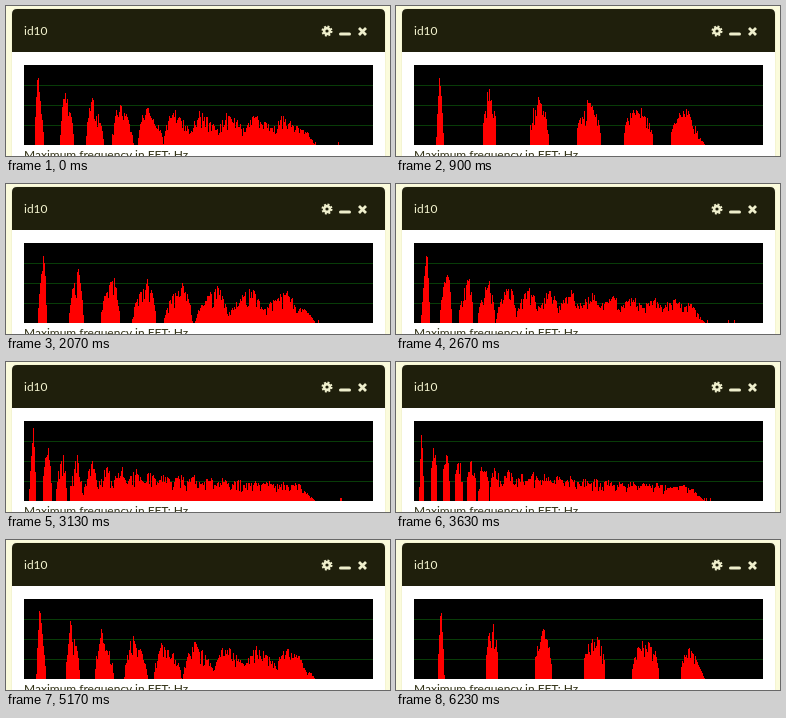
These frames come from a looping animation (384x150 px, 6260 ms). An HTML page:

```html
<!DOCTYPE html>
<html lang="en">
<head>
<meta charset="utf-8">
<title>Spectrum panel</title>
<style>
  html, body { margin: 0; width: 100%; height: 100%; overflow: hidden; background: #fbfbdc; }
  svg { display: block; width: 384px; height: 150px; }
  text { font: 12px Lato, sans-serif; }
</style>
</head>
<body>
<svg viewBox="0 0 384 150">
  <rect x="5.5" y="2.5" width="374" height="170" rx="5" fill="#fff" stroke="#f4f4d2"/>
  <path d="M6 46V8q0-5 5-5H374q5 0 5 5V46z" fill="#1f1f0c"/>
  <text x="18" y="29" fill="#f4f4d0">id10</text>
  <g fill="none" stroke="#eeeecc">
    <circle cx="321" cy="25" r="2.9" stroke-width="2.6"/>
    <circle cx="321" cy="25" r="4.5" stroke-width="2" stroke-dasharray="1.9 1.634"/>
    <path d="M334.5 28H343.5" stroke-width="3" stroke-linecap="round"/>
    <path d="M353 22l7 7m0-7l-7 7" stroke-width="2.8"/>
  </g>
  <path d="M18 59H367V139H18z"/>
  <path d="M18 79.5H367M18 99.5H367M18 119.5H367" stroke="#083c08"/>
  <path id="bars" fill="#f00" shape-rendering="crispEdges"/>
  <text x="18" y="152.5" fill="#333318">Maximum frequency in FFT: Hz</text>
</svg>
<script>
const LOOP = 6260, STEP = 33, SWEEP = 5000, PEAK = 1140;
const LEFT = 19, BASE = 139, WIDTH = 348;
const bars = document.getElementById('bars');
const clamp = v => Math.max(0, Math.min(1, v));

function noise(a, b) {
  let h = Math.imul(a + 1, 374761393) ^ Math.imul(b + 7, 668265263);
  h = Math.imul(h ^ (h >>> 13), 1274126177);
  return ((h ^ (h >>> 16)) >>> 0) / 4294967296;
}

// Odd harmonics of a square wave whose pitch sweeps up and down.
function spectrum(t) {
  const phase = 2 * Math.PI * (t - PEAK) / SWEEP;
  const pitch = 12.6 * Math.exp(0.71 * Math.cos(phase));
  const speed = -Math.sin(phase), rate = Math.abs(speed);
  const lean = -0.35 * speed, power = 0.25 + 0.3 * rate;
  const heights = new Float32Array(WIDTH);

  for (let n = 1; n * pitch < 310; n += 2) {
    const mid = n * pitch;
    const half = 2.2 + 1.7 * rate + mid * (0.045 + 0.027 * rate);
    const top = 73 - 35 * Math.log10(n);
    const end = Math.min(WIDTH - 1, mid + half);
    for (let x = Math.max(0, Math.ceil(mid - half)); x <= end; x++) {
      const u = (x - mid) / half;
      const v = u < lean ? (u + 1) / (1 + lean) : (1 - u) / (1 - lean);
      const shape = n === 1 ? 0.8 : power;
      heights[x] = Math.max(heights[x], top * clamp(v) ** shape);
    }
  }
  return heights;
}

function draw(now) {
  const t = now % LOOP, tick = Math.floor(t / STEP);
  let d = '';
  spectrum(tick * STEP).forEach((height, x) => {
    const r = noise(x, tick);
    const jag = 0.3 * r + 0.3 * r ** 8 - 0.06;
    let h = height * (1 - jag * clamp(x / 40)) * clamp((290 - x) / 16);
    if (x > 262 && x < 325 && r < 0.03) h = Math.max(h, 3);
    h = Math.round(h);
    if (h > 0) d += `M${LEFT + x} ${BASE}v${-h}h1v${h}z`;
  });
  bars.setAttribute('d', d);
  requestAnimationFrame(draw);
}
draw(0);
</script>
</body>
</html>
```
